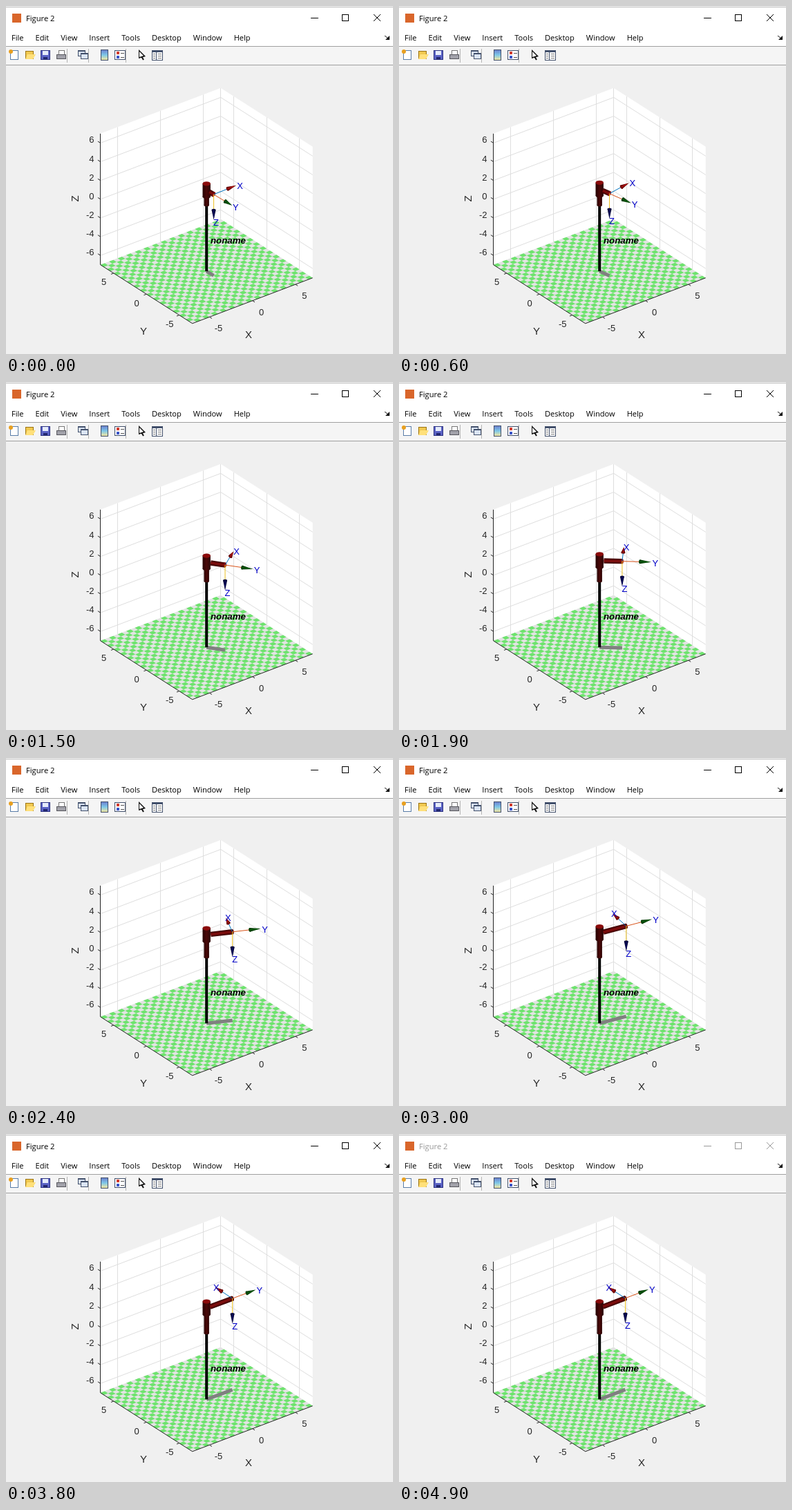
Recreate the animation shown at these times as an HTML page with a canvas. Size 560x504 px, loop 5 s.

```html
<!DOCTYPE html>
<html lang="en">
<head>
<meta charset="utf-8">
<title>Figure 2</title>
<style>
html, body { margin: 0; height: 100%; overflow: hidden; background: #f0f0f0; }
canvas { display: block; }
</style>
</head>
<body>
<canvas id="stage" width="560" height="504"></canvas>
<script>
const stage = document.getElementById('stage');
const back = document.createElement('canvas');
back.width = 560;
back.height = 504;
let g = back.getContext('2d');

const SANS = '"Liberation Sans", Arial, sans-serif';
const UI = '"Open Sans", "Noto Sans", sans-serif';
const INK = '#262626', GRID = '#dedede', EDGE = '#42506b';
const R = 7; // half size of the plot box

// World to screen, orthographic
const P = (x, y, z) => [290.2 + 12.43 * x - 9.5 * y, 289.3 - 4.72 * x - 6.07 * y - 13.57 * z];

function path(pts) {
  g.beginPath();
  pts.forEach(p => g.lineTo(p[0], p[1]));
}
function line(color, width, ...pts) {
  path(pts);
  g.strokeStyle = color;
  g.lineWidth = width;
  g.stroke();
}
function upright(color, x, y) {
  const snap = p => [Math.floor(p[0]) + .5, p[1]];
  line(color, 1, snap(P(x, y, -R)), snap(P(x, y, R)));
}
function poly(color, ...pts) {
  path(pts);
  g.closePath();
  g.fillStyle = color;
  g.fill();
}
function rect(color, x, y, w, h) {
  g.fillStyle = color;
  g.fillRect(x, y, w, h);
}
function panel(fill, edge, x, y, w, h) {
  rect(edge, x, y, w, h);
  rect(fill, x + 1, y + 1, w - 2, h - 2);
}
function oval(color, x, y, rx, ry, turn = 0) {
  g.beginPath();
  g.ellipse(x, y, rx, ry, turn, 0, 2 * Math.PI);
  g.fillStyle = color;
  g.fill();
}
function text(str, x, y, font, color = INK, align = 'center') {
  g.font = font;
  g.fillStyle = color;
  g.textAlign = align;
  g.fillText(str, x, y);
}
function blend(x0, y0, x1, y1, ...colors) {
  const fill = g.createLinearGradient(x0, y0, x1, y1);
  colors.forEach((c, i) => fill.addColorStop(i / (colors.length - 1), c));
  return fill;
}

// Toolbar icons, each around its own centre
function newFile() {
  panel('#fff', '#5a7da8', -6, -7, 12, 14);
  oval('#e8a020', -5, -5, 3, 3);
}
function openFolder() {
  panel('#f0c850', '#9c7412', -7, -6, 12, 12);
  poly('#ffe07a', [-4, -1], [8, -1], [4, 6], [-7, 6]);
}
function save() {
  panel('#5a62c4', '#2c3280', -7, -7, 14, 14);
  rect('#e6ecfa', -4, -6, 8, 6);
  rect('#23286e', -3, 3, 6, 3);
}
function printer() {
  panel('#fff', '#777', -4, -7, 9, 8);
  panel('#a2a2aa', '#55555c', -7, -1, 14, 7);
}
function linked() {
  for (const d of [-7, -3]) {
    panel('#dbe5f5', EDGE, d, d, 11, 9);
    rect(EDGE, d, d, 11, 2);
  }
}
function colorBar() {
  panel(blend(0, -7, 0, 7, '#6c83cf', '#7ec8e8', '#f2e6a0'), EDGE, -5, -8, 11, 16);
}
function legend() {
  panel('#fff', EDGE, -8, -7, 16, 14);
  ['#d23b2e', '#3a55c8'].forEach((c, i) => {
    rect(c, -5, 6 * i - 5, 4, 4);
    rect('#555', 1, 6 * i - 3, 5, 1);
  });
}
function pointer() {
  line('#111', 2, [0, 2], [3, 7]);
  poly('#111', [-4, -8], [-4, 5], [6, 2]);
  poly('#fff', [-3, -5], [-3, 3], [3, 1]);
}
function inspector() {
  panel('#fff', EDGE, -8, -7, 16, 15);
  rect(EDGE, -8, -7, 16, 3);
  rect(EDGE, -2, -7, 1, 15);
  for (let y = -2; y < 6; y += 3) {
    rect('#777', -6, y, 3, 1);
    rect('#777', 1, y, 5, 1);
  }
}

function drawToolbar() {
  const groups = [[newFile, openFolder, save, printer], [linked], [colorBar, legend], [pointer, inspector]];
  let x = 12;
  groups.forEach((icons, i) => {
    if (i) {
      rect('#b4b4b4', Math.round(x - 15), 62, 1, 20);
      x += 8.2;
    }
    for (const icon of icons) {
      g.save();
      g.translate(Math.round(x - .1), 71);
      icon();
      g.restore();
      x += 22.8;
    }
  });
}

function drawWindow() {
  rect('#f0f0f0', 0, 0, 560, 504);
  rect('#fff', 0, 0, 560, 58);
  rect('#f5f5f5', 0, 59, 560, 26);
  rect('#b5b5b5', 0, 1, 560, 1);
  for (const y of [58, 85]) rect('#a0a0a0', 0, y, 560, 1);
  rect('#d9662b', 9, 11, 13, 13);
  let x = 8;
  for (const word of 'File Edit View Insert Tools Desktop Window Help'.split(' ')) {
    text(word, x, 50, '11.1px ' + UI, '#000', 'left');
    x += g.measureText(word).width + 17;
  }
  line('#111', 1, [548, 43], [553, 47]);
  poly('#111', [555, 43], [555, 49], [549, 49]);
  drawToolbar();
}

function drawFloor(d) {
  poly('#e2e4e2', P(-R, -R, -R), P(R, -R, -R), P(R, R, -R), P(-R, R, -R));
  for (let i = 0; i < 2 * R / d; i++) {
    for (let j = 1 - i % 2; j < 2 * R / d; j += 2) {
      const x = i * d - R, y = j * d - R;
      poly('#6ee36e', P(x, y, -R), P(x + d, y, -R), P(x + d, y + d, -R), P(x, y + d, -R));
    }
  }
}

function drawAxes() {
  poly('#fff', P(-R, R, -R), P(-R, R, R), P(R, R, R), P(R, -R, R), P(R, -R, -R), P(R, R, -R));
  for (let z = -6; z <= 6; z += 2) line(GRID, 1, P(-R, R, z), P(R, R, z), P(R, -R, z));
  for (let v = -5; v <= 5; v += 5) {
    upright(GRID, v, R);
    upright(GRID, R, v);
  }
  upright(GRID, R, R);
  drawFloor(.5);

  const font = '13px ' + SANS;
  upright(INK, -R, R);
  line(INK, 1, P(-R, R, -R), P(-R, -R, -R), P(R, -R, -R));
  for (let v = -5; v <= 5; v += 5) {
    const a = P(v, -R, -R), b = P(-R, v, -R);
    line(INK, 1, a, P(v, -R - .35, -R));
    line(INK, 1, b, P(-R - .3, v, -R));
    text(v, a[0] + 13, a[1] + 21, font);
    text(v, b[0] - 14, b[1] + 17.5, font);
  }
  for (let z = -6; z <= 6; z += 2) {
    const p = P(-R, R, z);
    line(INK, 1, p, P(-R, R + .4, z));
    text(z, 127.5, p[1], font, INK, 'right');
  }
  text('X', 351, 481, '15px ' + SANS);
  text('Y', 199, 476, '15px ' + SANS);
  g.save();
  g.translate(105, 279);
  g.rotate(-Math.PI / 2);
  text('Z', 0, 0, '15px ' + SANS);
  g.restore();
}

function drawTitle(active) {
  const ink = active ? '#000' : '#999';
  text('Figure 2', 29, 22, '11.2px ' + UI, ink, 'left');
  rect(ink, 441, 17, 11, 1);
  panel('#fff', ink, 486, 12, 10, 10);
  line(ink, 1, [532, 12], [542, 22]);
  line(ink, 1, [542, 12], [532, 22]);
}

function cylinder(x, w, y0, y1) {
  const fill = blend(x - w, 0, x + w, 0, '#260202', '#4a0808', '#2a0303');
  rect(fill, x - w, y0, 2 * w, y1 - y0);
  oval(fill, x, y1, w, w * .5);
}

// Axis line, cone head and letter along a screen direction
function arrow(name, [x, y], [dx, dy], shaft, dark, light) {
  const at = k => [x + k * dx, y + k * dy];
  const base = at(1.65), tip = at(2.7), label = at(2.85);
  const len = Math.hypot(dx, dy), nx = -dy / len * 3, ny = dx / len * 3;
  line(shaft, 1, [x, y], base);
  oval(dark, ...base, 1.6, 3, Math.atan2(dy, dx));
  poly(dark, [base[0] + nx, base[1] + ny], tip, [base[0] - nx, base[1] - ny]);
  line(light, 1.2, base, at(2.4));
  text(name, label[0] + 3.5, label[1] + 6, '13px ' + SANS, '#0000c8');
}

function drawRobot(t) {
  const u = Math.min(1, (t + .7) / 4.95);
  const s = u ** 3 * (10 - 15 * u + 6 * u * u);
  const turn = -Math.PI / 2 * (1 - s), reach = 1 + 2 * s;
  const c = Math.cos(turn), n = Math.sin(turn), z = 1.63 + 1.12 * s;
  const along = r => P(r * c, r * n, z);
  const hub = P(0, 0, z), end = along(reach), foot = P(0, 0, -R);
  const aim = (x, y, z) => P(x, y, z).map((v, i) => v - P(0, 0, 0)[i]);

  line('#808080', 5, foot, P(reach * c, reach * n, -R));
  line('#000', 4, P(0, 0, 0), foot);
  cylinder(hub[0], 3.7, hub[1], 288.5);
  cylinder(hub[0], 5.7, hub[1] - 9.6, hub[1] + 9.4);
  oval('#8a0a0a', hub[0], hub[1] - 9.6, 5.7, 3.1);

  const start = along(.4), tilt = Math.atan2(end[1] - start[1], end[0] - start[0]);
  line('#450505', 7.4, start, end);
  line('#7a0c0c', 3.6, start, end);
  oval(turn < -.7 ? '#8a0a0a' : '#5a0707', ...end, 2, 3.7, tilt);

  arrow('X', end, aim(-n, c, 0), '#0072bd', '#6b0707', '#b81414');
  arrow('Y', end, aim(c, n, 0), '#d95319', '#063d06', '#0b6410');
  arrow('Z', end, aim(0, 0, -1), '#edc020', '#06063c', '#0c0c68');
  text('noname', 296, 344, 'italic bold 13.3px ' + SANS, '#000', 'left');
}

drawWindow();
drawAxes();
g = stage.getContext('2d');

function frame(now) {
  const t = Math.floor(now % 5000 / 100) / 10;
  g.drawImage(back, 0, 0);
  drawTitle(t < 4.6);
  drawRobot(t);
  requestAnimationFrame(frame);
}
frame(performance.now());
</script>
</body>
</html>
```
